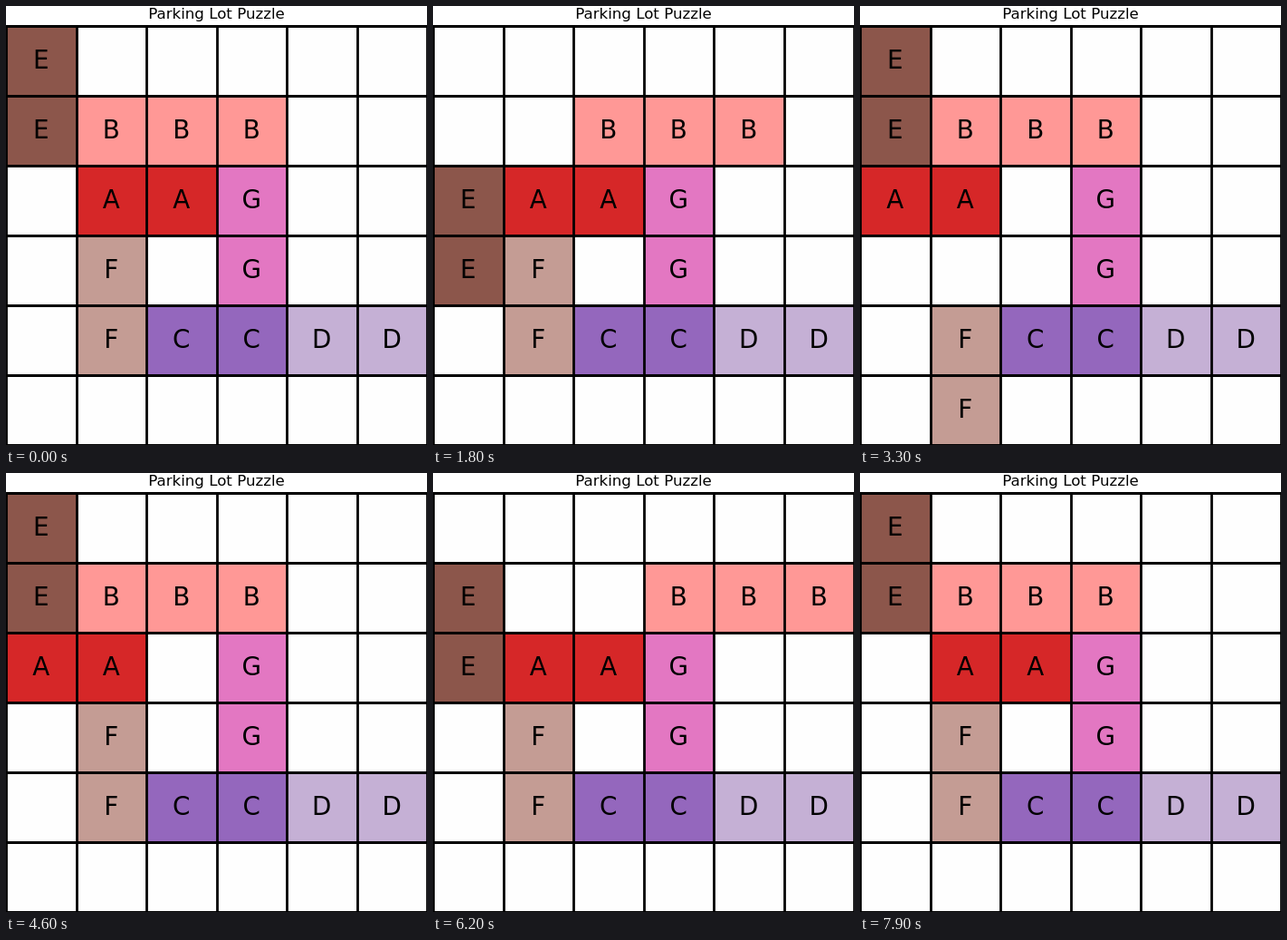
Write an HTML page with a canvas that moves like this. It is 465 by 484 pixels and loops after 8 s.

```html
<!DOCTYPE html>
<html lang="en">
<head>
<meta charset="utf-8">
<title>Parking Lot Puzzle</title>
<style>
html, body { margin: 0; width: 100%; height: 100%; overflow: hidden; background: #fff; }
canvas { display: block; }
</style>
</head>
<body>
<canvas id="stage" width="465" height="484"></canvas>
<script>
const ctx = document.getElementById("stage").getContext("2d");
const STEP = 100, SIZE = 6, LOOP = 8000;
const FONT = '"DejaVu Sans", Verdana, sans-serif';

// pos is the cell the car slides along; lane is its fixed row or column.
const cars = {
  A: { color: "#d62728", lane: 2, pos: 1, len: 2 },
  B: { color: "#ff9896", lane: 1, pos: 1, len: 3 },
  C: { color: "#9467bd", lane: 4, pos: 2, len: 2 },
  D: { color: "#c5b0d5", lane: 4, pos: 4, len: 2 },
  E: { color: "#8c564b", lane: 0, pos: 0, len: 2, vertical: true },
  F: { color: "#c49c94", lane: 1, pos: 3, len: 2, vertical: true },
  G: { color: "#e377c2", lane: 3, pos: 2, len: 2, vertical: true }
};

// One slide per step: car letter and the cell it moves to.
const moves = (
  "B2 F4 A0 B3 F3 B1 F4 B2 A1 " +
  "B3 E1 F3 B1 E2 F4 B3 F3 B2 " +
  "E3 F4 B3 E1 F3 B1 E2 F4 B2 " +
  "E1 F3 B1 E0 A0 F4 B2 F3 B1 " +
  "A1 B2 F4 A0 B1 F3 B2 F4 B1 " +
  "F3 B3 F4 A1 E1 B1 F3 B3 F4 " +
  "B2 F3 B3 F4 B1 F3 B2 B3 F4 " +
  "E2 B2 F3 B1 F4 E3 B3 F3 E2 " +
  "F4 B2 E1 F3 E0 B3 B1"
).split(" ");

const lineX = i => Math.round(77.5 * i) + 0.5;
const lineY = i => 22.5 + 77 * i;

function positionsAt(step) {
  const pos = {};
  for (const name in cars) pos[name] = cars[name].pos;
  for (const [name, cell] of moves.slice(0, step)) pos[name] = +cell;
  return pos;
}

function eachCell(pos, paint) {
  for (const name in cars) {
    const car = cars[name];
    for (let i = 0; i < car.len; i++) {
      const along = pos[name] + i;
      if (car.vertical) paint(name, car.lane, along);
      else paint(name, along, car.lane);
    }
  }
}

function drawGrid() {
  ctx.strokeStyle = "#000";
  ctx.lineWidth = 2.78;
  ctx.beginPath();
  for (let i = 0; i <= SIZE; i++) {
    ctx.moveTo(lineX(i), lineY(0) - 1.39);
    ctx.lineTo(lineX(i), lineY(SIZE));
    ctx.moveTo(0, lineY(i));
    ctx.lineTo(lineX(SIZE), lineY(i));
  }
  ctx.stroke();
}

function draw(step) {
  const pos = positionsAt(step);
  ctx.fillStyle = "#fff";
  ctx.fillRect(0, 0, 465, 484);
  ctx.fillStyle = "#fefefe";
  ctx.fillRect(0, 22, 465, 462);

  eachCell(pos, (name, col, row) => {
    ctx.fillStyle = cars[name].color;
    ctx.fillRect(lineX(col), lineY(row), lineX(col + 1) - lineX(col), 77);
  });
  drawGrid();

  ctx.fillStyle = "#000";
  ctx.textAlign = "center";
  ctx.textBaseline = "alphabetic";
  ctx.font = "16.67px " + FONT;
  ctx.fillText("Parking Lot Puzzle", 232.5, 14);
  ctx.font = "27.78px " + FONT;
  eachCell(pos, (name, col, row) => {
    ctx.fillText(name, 77.5 * (col + 0.5), 69 + 77 * row);
  });
}

const start = performance.now();
let shown = -1;

function tick() {
  const step = Math.floor((performance.now() - start) % LOOP / STEP);
  if (step !== shown) draw(shown = step);
  requestAnimationFrame(tick);
}
tick();
</script>
</body>
</html>
```
